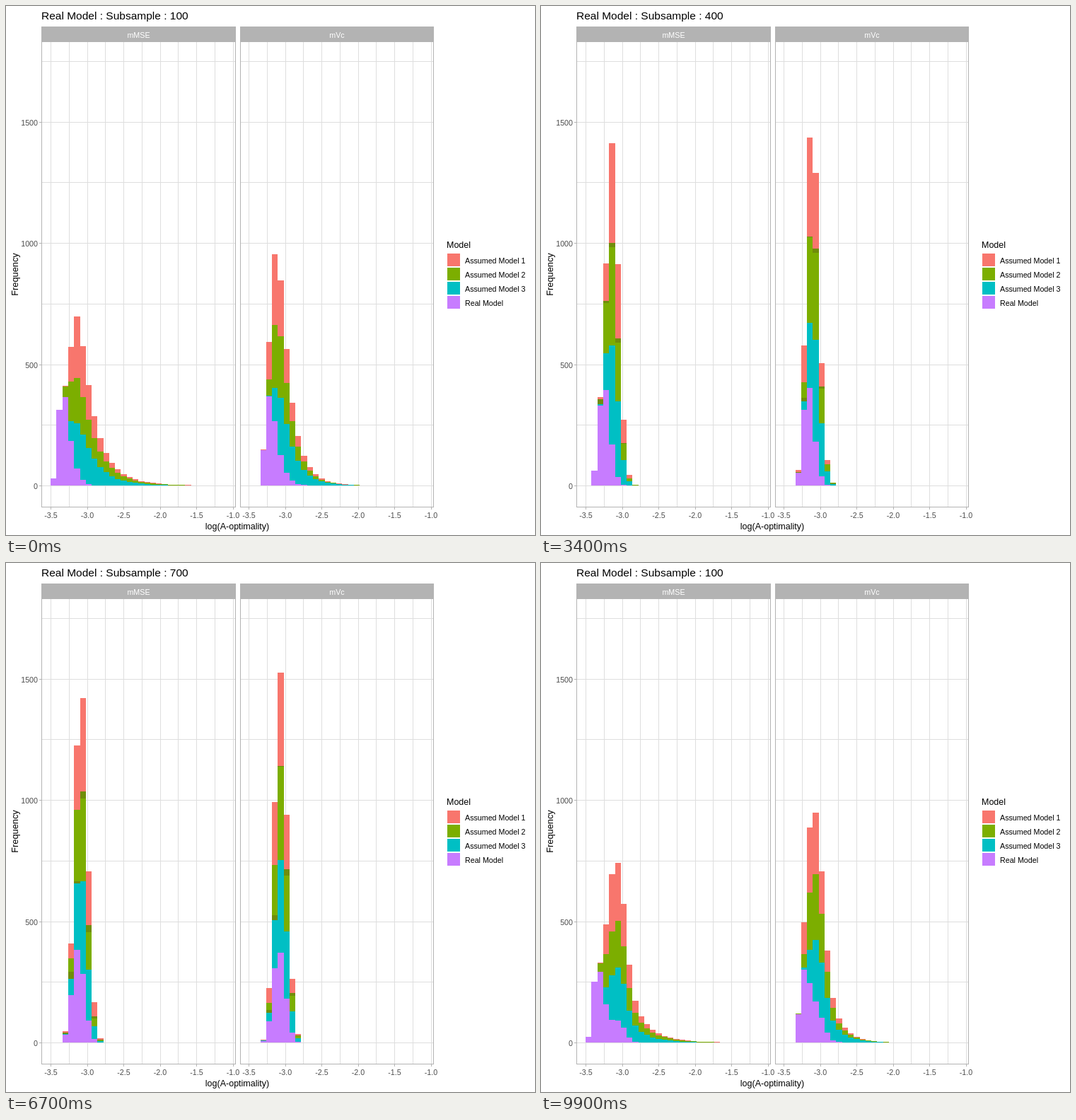
These frames come from a looping animation (748 by 748 pixels, 10000 ms). An HTML page:

```html
<!DOCTYPE html>
<html lang="en">
<head>
<meta charset="utf-8">
<title>Subsample histograms</title>
<style>
html, body { margin: 0; width: 100%; height: 100%; overflow: hidden; background: #fff; }
svg { display: block; width: 748px; height: 748px; font: 10.7px "Liberation Sans", Arial, sans-serif; }
path, rect { shape-rendering: crispEdges; }
</style>
</head>
<body>
<svg id="chart" viewBox="0 0 748 748"></svg>
<script>
const chart = document.getElementById('chart');
const MODELS = ['Assumed Model 1', 'Assumed Model 2', 'Assumed Model 3', 'Real Model'];
const COLORS = ['#F8766D', '#7CAE00', '#00BFC4', '#C77CFF'];
const GRAY = '#B3B3B3', FRESH_GREEN = '#708D0A';
const BIN_W = 8.27, STATES = 9;

// Each model spreads 1000 draws over the bins. Its median, in bins, runs from
// start along slope and curve; lift and tail only matter for small subsamples.
const model = (start, slope, curve, lift, tail) => ({ start, slope, curve, lift, tail });
const PANELS = [
  { name: 'mMSE', left: 50, right: 325, grid: 63.5, bars: 63.2, bins: 25, models: [
    model(4.64, 1.05, 0.19, 1.10, 1.62), model(4.48, 0.70, 0.70, 1.35, 3.02),
    model(4.72, 0.60, 0.60, 1.69, 2.78), model(2.74, 2.97, 0, 0.63, 0.33)] },
  { name: 'mVc', left: 331, right: 605, grid: 343.5, bars: 343, bins: 22, models: [
    model(4.66, 1.00, 0.27, 0.82, 1.14), model(5.00, 0.80, 0.13, 0.92, 1.33),
    model(5.43, 0, 0.61, 1.08, 1.95), model(3.98, 1.89, 0, 0.60, 0.50)] }
];

const normalCdf = z => 1 / (1 + Math.exp(-1.5976 * z - 0.07056 * z ** 3));

// Shifted log-normal, set by its median and the distances to the 16% and 84% points.
function skewCdf(x, median, low, high) {
  const scale = low * high / (high - low), t = 1 + (x - median) / scale;
  return t > 0 ? normalCdf(Math.log(t) / Math.log(high / low)) : 0;
}

function counts({ start, slope, curve, lift, tail }, bins, n) {
  const u = (n - 300) / 600, small = Math.exp((100 - n) / 55);
  const median = start + slope * u + curve * u * u + lift * small;
  const low = 0.68 + n * 0.0004 + 0.4 * tail * small;
  const high = 0.88 + n * 0.0002 + tail * small;
  const below = x => 1000 * skewCdf(x, median, low, high);
  return Array.from({ length: bins }, (_, b) => below(b + 1) - below(b));
}

// Stacked tops as [panel][bin][model], the real model at the bottom.
const states = Array.from({ length: STATES }, (_, i) => PANELS.map(({ models, bins }) => {
  const parts = models.map(m => counts(m, bins, (i + 1) * 100));
  return Array.from({ length: bins }, (_, b) =>
    parts.map((_, m) => parts.slice(m).reduce((sum, part) => sum + part[b], 0)));
}));

const mix = (from, to, f) => states[from].map((panel, p) => panel.map((tops, b) =>
  tops.map((top, m) => top + (states[to][p][b][m] - top) * f)));

function add(tag, attrs, text = '') {
  const el = document.createElementNS('http://www.w3.org/2000/svg', tag);
  for (const name in attrs) el.setAttribute(name, attrs[name]);
  el.textContent = text;
  return chart.appendChild(el);
}
const label = (text, x, y, attrs) => add('text', { x, y, ...attrs }, text);
const box = (x, y, width, height, fill) => add('rect', { x, y, width, height, fill });
const lines = (d, stroke) => add('path', { d, stroke });
const pixel = v => Math.floor(v) + 0.5;
const repeat = (n, draw) => Array.from({ length: n }, (_, i) => draw(i)).join('');

// Grid
for (const { left, right, grid } of PANELS) {
  lines(repeat(11, i => `M${pixel(grid + i * 25.75)} 51V708`) +
    repeat(8, i => `M${left} ${pixel(678.5 - i * 85.75)}H${right}`), '#DEDEDE');
}

const [red, green, fresh, teal, purple] =
  [COLORS[0], COLORS[1], FRESH_GREEN, COLORS[2], COLORS[3]].map(fill => add('path', { fill }));
const layers = [red, green, teal, purple];

// Borders, strips and axes
for (const { name, left, right, grid } of PANELS) {
  const width = right - left;
  add('rect', { x: left + .5, y: 50.5, width: width - 1, height: 658, fill: 'none', stroke: GRAY });
  box(left, 29, width, 21, GRAY);
  label(name, left + width / 2, 44.5, { fill: '#fff', 'text-anchor': 'middle' });
  lines(repeat(6, i => `M${pixel(grid + i * 51.5)} 709v3`), GRAY);
  for (let i = 0; i < 6; i++) {
    label((i / 2 - 3.5).toFixed(1), grid + i * 51.5, 724, { fill: '#4D4D4D', 'text-anchor': 'middle' });
  }
}
for (let i = 0; i < 4; i++) {
  const y = 678.5 - i * 171.5;
  lines(`M47 ${pixel(y)}h3`, GRAY);
  label(i * 500, 45, y + 4.5, { fill: '#4D4D4D', 'text-anchor': 'end' });
}
label('log(A-optimality)', 327, 740, { 'font-size': 12.5, 'text-anchor': 'middle' });
label('Frequency', 0, 0, { 'font-size': 12.8, 'text-anchor': 'middle', transform: 'translate(17 379.5) rotate(-90)' });
const title = label('', 50, 19, { 'font-size': 15.5 });

// Legend
label('Model', 623, 342, { 'font-size': 12.5 });
MODELS.forEach((name, i) => {
  box(624, 350 + i * 20, 18, 18, COLORS[i]);
  label(name, 649, 363.5 + i * 20);
});

const yOf = count => Math.round(678.4 - count * 0.343);
function bar(p, b, top, bottom = 0) {
  const edge = i => Math.round(PANELS[p].bars + i * BIN_W);
  const y = yOf(top), base = yOf(bottom);
  return y < base ? `M${edge(b)} ${y}H${edge(b + 1)}V${base}H${edge(b)}Z` : '';
}
const eachBin = (data, draw) =>
  data.map((panel, p) => panel.map((tops, b) => draw(p, b, tops)).join('')).join('');

// Parts that turned green in the last step stay darker while a state rests.
const freshGreen = (data, before) => eachBin(data, (p, b, [, g, t]) => {
  const [, oldG, oldT] = before[p][b];
  return bar(p, b, g, Math.max(t, oldG)) + bar(p, b, Math.min(oldT, g), t);
});

// The first two changes take six steps of 100 ms, the others five; rests last 700 ms.
const stepsOf = i => i < 2 ? 6 : 5;
const startOf = i => 6 + 11 * i + Math.min(i, 2);
let lastTick = -1;

function frame(now) {
  const tick = Math.floor(now % 10000 / 100);
  if (tick !== lastTick) {
    lastTick = tick;
    let from = 0;
    while (from < STATES - 1 && tick >= startOf(from + 1)) from++;
    const to = (from + 1) % STATES, steps = stepsOf(from);
    const f = Math.min(1, Math.max(0, (tick - startOf(from) + 1) / steps));
    const data = mix(from, to, f);
    layers.forEach((el, m) => el.setAttribute('d', eachBin(data, (p, b, tops) => bar(p, b, tops[m]))));
    fresh.setAttribute('d', f === 1 ? freshGreen(data, mix(from, to, 1 - 1 / steps)) : '');
    title.textContent = `Real Model : Subsample : ${((f >= .5 ? to : from) + 1) * 100}`;
  }
  requestAnimationFrame(frame);
}
frame(performance.now());
</script>
</body>
</html>
```
